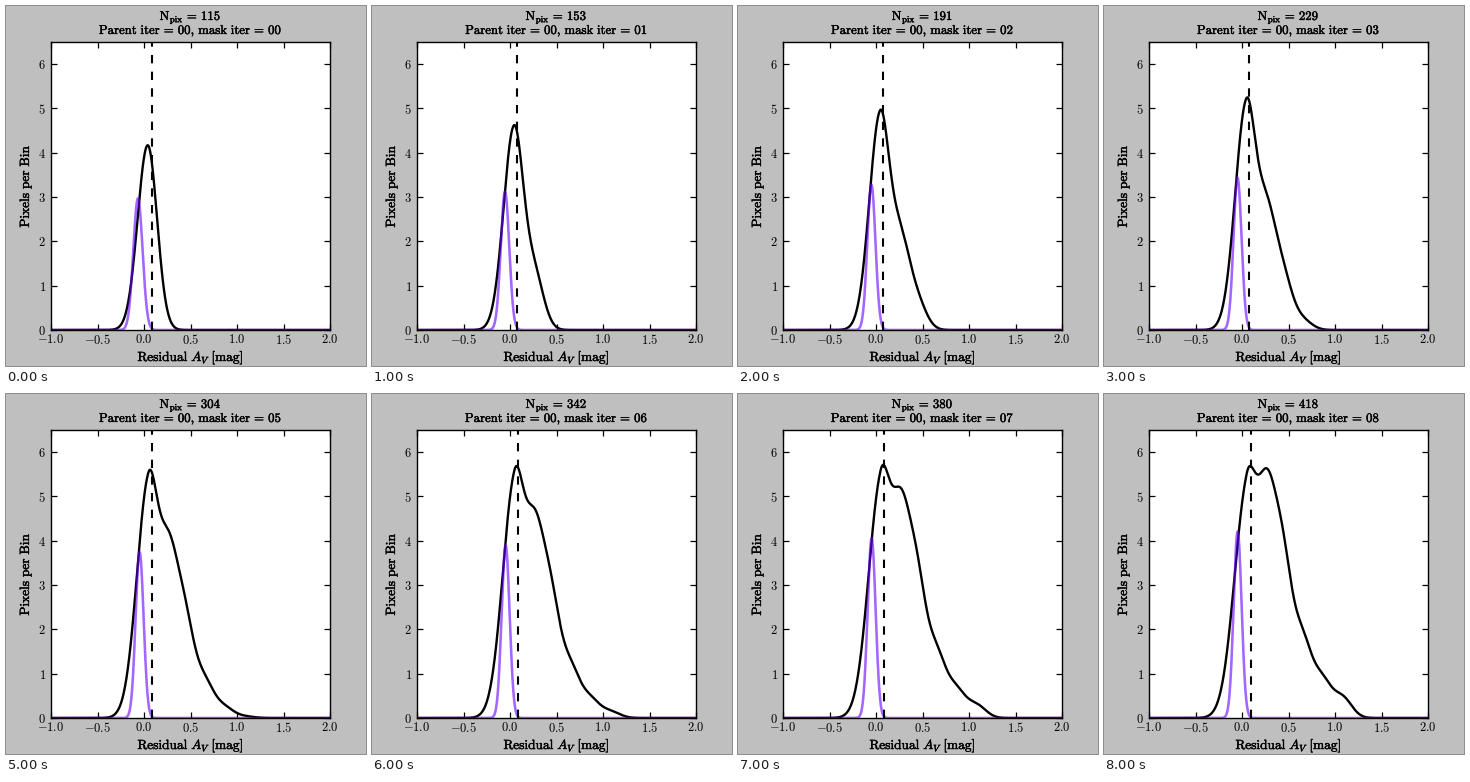
A matplotlib script that plays this animation: 360 px wide and 360 px high, repeating every 9 s.

```python
import numpy as np
import matplotlib.pyplot as plt
from matplotlib.animation import FuncAnimation
from matplotlib.patheffects import withStroke

plt.rcParams.update({"mathtext.fontset": "cm", "axes.linewidth": 1})

STEPS = 9
LAST = STEPS - 1
# Positions and final heights of the groups that join as the mask grows
CENTRES = [0.26, 0.44, 0.65, 0.86, 1.08]
HEIGHTS = [4.45, 3.2, 1.6, 0.8, 0.45]


def bell(x, mu, sigma):
    return np.exp(-0.5 * ((x - mu) / sigma) ** 2)


def growth(k, j):
    """Share of group j present at step k; later groups start later."""
    start = 1.1 * j
    return max((k - start) / (LAST - start), 0) ** (0.62 + 0.2 * j)


def full_curve(x, k):
    mu = 0.04 + 0.00125 * k
    sigma = np.where(x < mu, 0.108 + 0.0035 * k, 0.1)
    y = (4.17 + 0.37 * k - 0.033 * k**2) * bell(x, mu, sigma)
    for j, (centre, height) in enumerate(zip(CENTRES, HEIGHTS)):
        y += height * growth(k, j) * bell(x, centre, 0.1)
    return y


def narrow_curve(x, k):
    settle = np.exp(-k)
    return (2.97 + 0.155 * k) * bell(x, -0.047 - 0.018 * settle,
                                     0.043 + 0.007 * settle)


def threshold(k):
    return 0.08 + 0.0004 * (k - 2) ** 2


def roman(text):
    text = text.replace(", ", r",\,").replace(" = ", r"\,=\,")
    return r"$\mathrm{" + text.replace(" ", r"\ ") + "}$"


fig = plt.figure(figsize=(3.6, 3.6), dpi=100, facecolor="0.75")
ax = fig.add_axes([0.125, 0.1, 0.775, 0.8])
ax.set(xlim=(-1, 2), ylim=(0, 6.5),
       xticks=np.arange(-1, 2.1, 0.5), yticks=range(7))
ax.xaxis.set_major_formatter(lambda v, _: f"${v:.1f}$")
ax.yaxis.set_major_formatter(lambda v, _: f"${v:.0f}$")
ax.tick_params(direction="in", top=True, right=True, length=4, width=0.9,
               pad=3.6, labelsize=9)
ax.tick_params(axis="x", pad=2.5)

x = np.linspace(-1, 2, 1000)
full, = ax.plot([], [], color="black", lw=1.7)
narrow, = ax.plot([], [], color="#6600ff", alpha=0.6, lw=1.85)
cut, = ax.plot([], [], color="black", lw=1.5, dashes=(4, 4),
               dash_capstyle="butt")


def write(px, py, text="", size=9.6, **kw):
    return fig.text(px / 360, 1 - py / 360, text, size=size, ha="center",
                    path_effects=[withStroke(linewidth=0.3,
                                             foreground="black")], **kw)


count = write(184.5, 14, size=9.2)
title = write(184.5, 28, size=9.2)
write(184.5, 355, roman("Residual ") + "$A_V$" + roman(" [mag]"))
write(19.5, 180, roman("Pixels per Bin"), rotation=90, va="center")


def draw(k):
    full.set_data(x, full_curve(x, k))
    narrow.set_data(x, narrow_curve(x, k))
    cut.set_data([threshold(k)] * 2, [0, 6.5])
    count.set_text(roman(f"N_{{pix}} = {round(115 + 37.9 * k)}"))
    title.set_text(roman(f"Parent iter = 00, mask iter = {k:02d}"))
    return full, narrow, cut, count, title


anim = FuncAnimation(fig, draw, frames=STEPS, interval=1000, repeat=True,
                     repeat_delay=0, blit=False)
plt.show()
```
